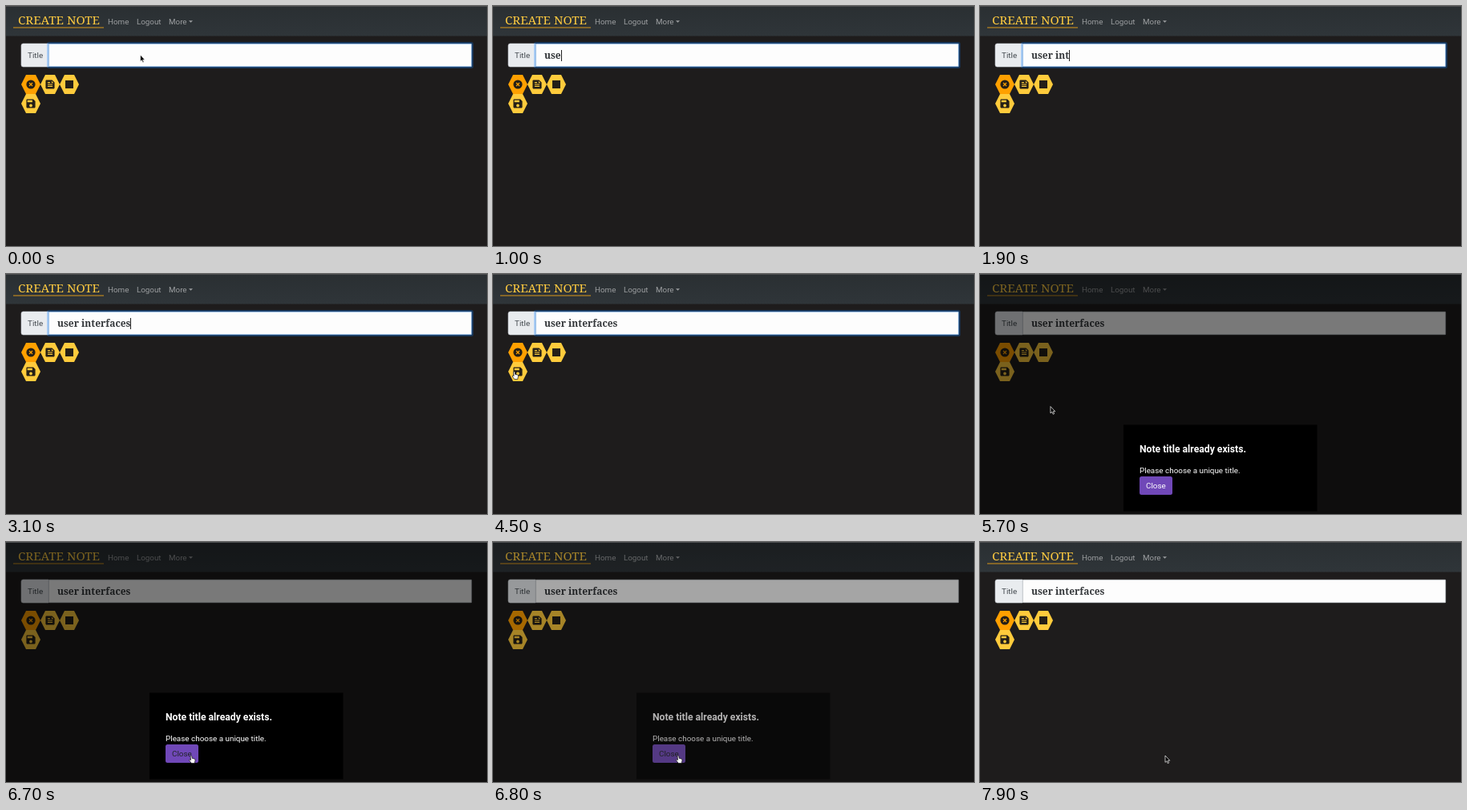
Write an HTML page that moves like this. It is 600x300 px and loops after 8.1 s.

```html
<!DOCTYPE html>
<html lang="en">
<head>
<meta charset="utf-8">
<title>Create note</title>
<style>
  html, body { margin: 0; width: 100%; height: 100%; overflow: hidden; background: #1e1c1c; }
  svg { display: block; width: 600px; height: 300px; }
  text { font: 9.9px Roboto, "Liberation Sans", sans-serif; white-space: pre; }
  .brand { font: 15.1px "Noto Serif", Georgia, serif; fill: #fdca40; }
  .nav { font-size: 9.8px; fill: #9c9ea0; }
  .value { font: bold 12px "Noto Serif", Georgia, serif; fill: #35383b; }
  .heading { font-size: 12.2px; font-weight: 600; }
  .icon { fill: #241f17; }
  .yellow { fill: #ffcb3c; }
  .orange { fill: #ffa000; }
</style>
</head>
<body>
<svg viewBox="0 0 600 300">
  <defs>
    <path id="hex" d="M-12 0L-6-12H6L12 0 6 12H-6Z"/>
    <linearGradient id="bar" x2="0" y2="1">
      <stop stop-color="#2a2f32"/><stop offset="1" stop-color="#2f3539"/>
    </linearGradient>
  </defs>

  <rect width="600" height="300" fill="#1e1c1c"/>
  <rect width="600" height="37.5" fill="url(#bar)"/>
  <rect width="600" height="1" fill="#4b4d4f"/>
  <text class="brand" x="15" y="23">CREATE NOTE</text>
  <rect x="9" y="26.5" width="113" height="1" fill="#d9981a"/>
  <text class="nav" x="127" y="23">Home</text>
  <text class="nav" x="163" y="23">Logout</text>
  <text class="nav" x="203" y="23">More</text>
  <path d="M228 18.2h5l-2.5 2.6z" fill="#9c9ea0"/>

  <path d="M53 47H21.5Q19 47 19 49.5V73.5Q19 76 21.5 76H53Z" fill="#e9ecef" stroke="#ced4da" stroke-width=".6"/>
  <text x="27" y="65.4" fill="#43494f">Title</text>
  <rect id="ring" x="52" y="46" width="530" height="31" rx="1.5" fill="none" stroke="#007bff" stroke-opacity=".27" stroke-width="2"/>
  <rect id="field" x="53.3" y="47.3" width="527.4" height="28.4" rx=".5" fill="#fdfdfd" stroke-width=".7"/>
  <text id="value" class="value" x="64" y="66"></text>
  <rect id="caret" y="55" width="1" height="14" fill="#222"/>

  <g transform="translate(31 98)">
    <use href="#hex" class="orange"/>
    <circle class="icon" r="5.6"/>
    <path d="M-2-2L2 2M2-2L-2 2" stroke="#ffa000" stroke-width="1.2"/>
  </g>
  <g transform="translate(55 98)">
    <use href="#hex" class="yellow"/>
    <path class="icon" transform="scale(.62) translate(-12 -12)" d="M16 3H5c-1.1 0-2 .9-2 2v14c0 1.1.9 2 2 2h14c1.1 0 2-.9 2-2V8l-5-5zM7 7h5v2H7V7zm10 10H7v-2h10v2zm0-4H7v-2h10v2zm-2-4V5l4 4h-4z"/>
  </g>
  <g transform="translate(79 98)">
    <use href="#hex" class="yellow"/>
    <rect class="icon" x="-5" y="-5" width="10" height="10"/>
  </g>
  <g transform="translate(31 122)">
    <use href="#hex" class="yellow"/>
    <path class="icon" transform="scale(.62) translate(-12 -12)" d="M17 3H5c-1.1 0-2 .9-2 2v14c0 1.1.9 2 2 2h14c1.1 0 2-.9 2-2V7l-4-4zm-5 16c-1.66 0-3-1.34-3-3s1.34-3 3-3 3 1.34 3 3-1.34 3-3 3zm3-10H5V5h10v4z"/>
  </g>

  <g id="dialog">
    <rect y="1" width="600" height="299" opacity=".52"/>
    <rect x="179" y="188.5" width="241.5" height="108"/>
    <text class="heading" x="199" y="223" fill="#fff">Note title already exists.</text>
    <text x="199" y="249" fill="#fff">Please choose a unique title.</text>
    <rect x="199" y="253" width="41" height="23" rx="2.5" fill="#7048b8"/>
    <text id="close" x="207" y="268.3">Close</text>
  </g>

  <g id="pointer">
    <path id="arrow" d="M0 0V8.4L1.9 6.7 3.2 9.7 4.6 9.1 3.3 6.2H5.8Z" fill="#000" stroke="#fff" stroke-width=".7"/>
    <path id="hand" d="M-1 .5Q0-.6.8.5L1.2 3.4 4 4Q5.4 4.4 5 6L4.2 9.6H.4L-2.4 6Q-2.6 4.6-1.2 5L-.4 5.6Z" fill="#fff" stroke="#111" stroke-width=".7"/>
  </g>
</svg>

<script>
  const LOOP = 8100, STEP = 100, BLINK = 500;
  const TITLE = "user interfaces";
  const KEY_TIMES = [400, 700, 900, 1100, 1300, 1500, 1700, 1900, 2000, 2100, 2300, 2400, 2500, 2700, 2900];
  const FIRST_KEY = KEY_TIMES[0];
  const SHOW = 3500, OPEN = 4700, CLOSE = 6700;

  const el = id => document.getElementById(id);
  const [ring, field, value, caret, dialog, closeLabel, pointer, arrow, hand] =
    ["ring", "field", "value", "caret", "dialog", "close", "pointer", "arrow", "hand"].map(el);

  const clamp = x => Math.min(1, Math.max(0, x));
  const between = (t, from, to) => t >= from && t < to;
  const show = (node, on) => node.setAttribute("visibility", on ? "visible" : "hidden");
  const glide = (t, from, to, [x0, y0], [x1, y1]) => {
    const u = clamp((t - from) / (to - from));
    const k = u * u * (3 - 2 * u);
    return [x0 + (x1 - x0) * k, y0 + (y1 - y0) * k];
  };

  function pointerAt(t) {
    if (t < FIRST_KEY) return [167.5, 61];
    if (t < 5300) return glide(t, 3400, 4300, [150, 68], [26.5, 122]);
    return glide(t, 5300, 6400, [26.5, 122], [231, 267]);
  }

  function drawField(t) {
    const typed = KEY_TIMES.filter(k => k <= t);
    const focused = t < OPEN;
    value.textContent = TITLE.slice(0, typed.length);
    show(ring, focused);
    field.setAttribute("stroke", focused ? "#80bdff" : "#ced4da");

    const idle = t - typed[typed.length - 1];
    const lit = typed.length > 0 && focused && (idle < 600 || Math.floor((idle - 600) / BLINK) % 2 === 1);
    show(caret, lit);
    if (lit) caret.setAttribute("x", Math.round(64 + value.getComputedTextLength()));
  }

  function drawDialog(t) {
    const opacity = t < OPEN ? 0 : Math.min(clamp((t - OPEN + 50) / 100), clamp(1 - (t - CLOSE) / 300));
    dialog.setAttribute("opacity", opacity);
    closeLabel.setAttribute("fill", between(t, 6300, 7000) ? "#212529" : "#fff");
  }

  function drawPointer(t) {
    const visible = !between(t, FIRST_KEY, SHOW);
    const linked = between(t, 4200, OPEN) || between(t, 6300, 6900);
    const [x, y] = pointerAt(t);
    pointer.setAttribute("transform", `translate(${x} ${y})`);
    show(arrow, visible && !linked);
    show(hand, visible && linked);
  }

  function frame() {
    const t = Math.floor(performance.now() % LOOP / STEP) * STEP;
    drawField(t);
    drawDialog(t);
    drawPointer(t);
    requestAnimationFrame(frame);
  }
  frame();
</script>
</body>
</html>
```
